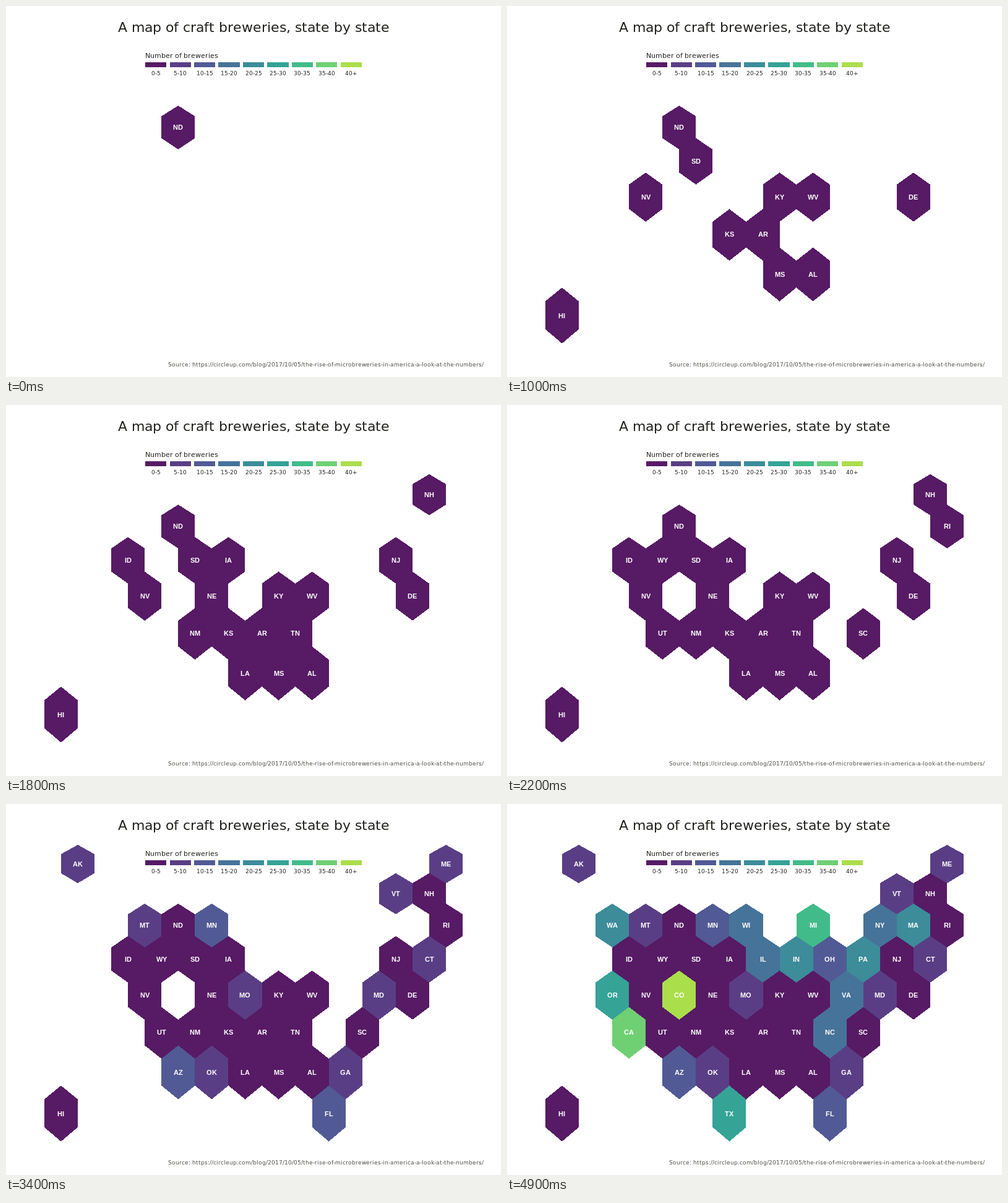
These frames come from a looping animation (800 by 600 pixels, 5000 ms). An HTML page:

```html
<!DOCTYPE html>
<html lang="en">
<head>
<meta charset="utf-8">
<title>Craft breweries</title>
<style>
html, body { margin: 0; width: 100%; height: 100%; overflow: hidden; background: #fff; }
svg { display: block; width: 800px; height: 600px; }
polygon, rect { shape-rendering: crispEdges; }
</style>
</head>
<body>
<svg id="stage" viewBox="0 0 800 600"></svg>
<script>
const stage = document.getElementById("stage");
const ruler = document.createElement("canvas").getContext("2d");
const sans = '"DejaVu Sans", sans-serif';
const bold = '"Liberation Sans", Arial, sans-serif';
const ink = "#22211d";

function add(tag, attrs, parent = stage) {
  const el = document.createElementNS("http://www.w3.org/2000/svg", tag);
  for (const name in attrs) el.setAttribute(name, attrs[name]);
  return parent.appendChild(el);
}

// Text whose glyphs advance by whole pixels; align 0 = left, 0.5 = centre
function write(text, x, y, size, { align = 0, fill = ink, family = sans, weight = "normal", parent = stage } = {}) {
  ruler.font = `${weight} 1000px ${family}`;
  const steps = [...text].map(c => Math.round(ruler.measureText(c).width * size / 1000));
  let pen = Math.round(x - align * steps.reduce((a, b) => a + b));
  const xs = steps.map(step => (pen += step) - step);
  add("text", {
    x: xs.join(" "), y, fill,
    "font-family": family, "font-size": size, "font-weight": weight
  }, parent).textContent = text;
}

const colors = ["#571a65", "#5a3e85", "#515a95", "#467399", "#3c8c99",
                "#35a396", "#42bb8a", "#6ed073", "#abde4b"];
const ranges = ["0-5", "5-10", "10-15", "15-20", "20-25", "25-30", "30-35", "35-40", "40+"];

// States in order of appearance, one group per colour
const groups = [
  "ND AR DE MS SD WV NV AL HI KS KY NH NJ NM TN IA ID LA NE RI SC UT WY",
  "AK CT GA MD ME OK MO MT VT",
  "AZ FL MN OH",
  "IL NC NY VA WI",
  "IN MA PA WA",
  "OR TX",
  "MI",
  "CA",
  "CO"
].map(g => g.split(" "));

// Map rows: first half-column, then every second one
const rows = [
  [1, "AK - - - - - - - - - - ME"],
  [20, "VT NH"],
  [3, "WA MT ND MN WI - MI - NY MA RI"],
  [4, "ID WY SD IA IL IN OH PA NJ CT"],
  [3, "OR NV CO NE MO KY WV VA MD DE"],
  [4, "CA UT NM KS AR TN NC SC"],
  [7, "AZ OK LA MS AL GA"],
  [0, "HI - - - - TX - - FL"]
];
const baselines = [101, 149, 200, 255, 313, 373, 438, 505];

const place = {};
rows.forEach(([start, names], row) =>
  names.split(" ").forEach((name, i) => place[name] = { row, col: start + 2 * i }));

// Hexagons are regular in Mercator and drawn by plain latitude
const latitude = m => Math.atan(Math.sinh(m));
const lineY = n => 66.1 + 794.4 * (latitude(1.08) - latitude(1.08 - 0.0305 * n));
const lineX = col => 88.93 + 27.05 * col;

write("A map of craft breweries, state by state", 400, 42, 22, { align: 0.5 });
write("Number of breweries", 225, 84, 11);
ranges.forEach((range, i) => {
  const x = 225.1 + 39.45 * i;
  add("rect", { x, y: 91, width: 34.2, height: 8, fill: colors[i] });
  write(range, x + 17.1, 112, 9, { align: 0.5 });
});
write("Source: https://circleup.com/blog/2017/10/05/the-rise-of-microbreweries-in-america-a-look-at-the-numbers/",
  262, 583, 9, { fill: "#4e4d47" });

const states = groups.flatMap((names, level) => names.map(name => {
  const { row, col } = place[name];
  const [l, x, r] = [col - 1, col, col + 1].map(lineX);
  const [top, upper, lower, bottom] = [0, 1, 3, 4].map(n => lineY(3 * row + n));
  const parent = add("g", {});
  add("polygon", {
    points: [x, top, r, upper, r, lower, x, bottom, l, lower, l, upper].join(" "),
    fill: colors[level]
  }, parent);
  write(name, x, baselines[row], 11, { align: 0.5, fill: "#fff", family: bold, weight: "bold", parent });
  return parent;
}));

function draw(now) {
  const shown = Math.floor(now % 5000 / 100);
  states.forEach((g, i) => g.style.display = i <= shown ? "" : "none");
  requestAnimationFrame(draw);
}
draw(performance.now());
</script>
</body>
</html>
```
